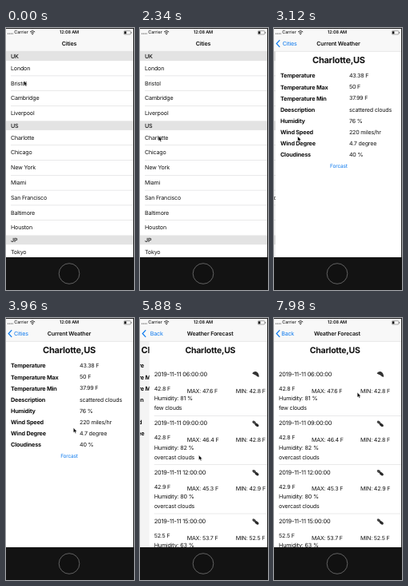
An HTML page that plays this animation: 160x328 px, repeating every 8 s.

```html
<!DOCTYPE html>
<html lang="en">
<head>
<meta charset="utf-8">
<title>Weather app</title>
<style>
  html, body { margin: 0; width: 100%; height: 100%; overflow: hidden; background: #111; }
  svg { display: block; width: 100%; height: 100%; }
  text {
    font-family: Inter, Roboto, "Liberation Sans", sans-serif;
    letter-spacing: -.025em; white-space: pre; text-rendering: geometricPrecision;
  }
</style>
</head>
<body>
<svg id="stage" viewBox="0 0 160 328"></svg>
<script>
const BLUE = '#0a78ee', LOOP = 8000, STEP = 60;

// y is the middle of the capitals
function text(s, x, y, { size = 7.1, weight = 400, anchor = 'start', fill = '#111', id = '' } = {}) {
  return `<text ${id && `id="${id}"`} x="${x}" y="${y + size * .36}" font-size="${size}"
    font-weight="${weight}" text-anchor="${anchor}" fill="${fill}">${s}</text>`;
}
const rect = (x, y, w, h, fill, more = '') =>
  `<rect x="${x}" y="${y}" width="${w}" height="${h}" fill="${fill}" ${more}/>`;
const rule = y => rect(6, y - .25, 154, .5, '#d2d2d4');
const page = (id, body) =>
  `<g id="${id}">${rect(0, 29, 160, 259, '#fff')}${body}${rect(0, 29, 160, 259, '#000', 'class="dim" opacity="0"')}</g>`;

function cityList() {
  const sections = {
    UK: ['London', 'Bristol', 'Cambridge', 'Liverpool'],
    US: ['Charlotte', 'Chicago', 'New York', 'Miami', 'San Francisco', 'Baltimore', 'Houston'],
    JP: ['Tokyo']
  };
  const head = 11.6, row = 18.8;
  let y = 29.5, out = '';
  for (const [country, cities] of Object.entries(sections)) {
    out += rect(0, y, 160, head, '#e3e3e3') + text(country, 6, y + 5.8, { weight: 500 });
    y += head;
    cities.forEach((city, i) => {
      if (i) out += rule(y);
      out += text(city, 6, y + 9.2);
      y += row;
    });
  }
  return out;
}

function currentWeather() {
  const facts = [
    ['Temperature', '43.38 F'], ['Temperature Max', '50 F'], ['Temperature Min', '37.99 F'],
    ['Deescription', 'scattered clouds'], ['Humidity', '76 %'], ['Wind Speed', '220 miles/hr'],
    ['Wind Degree', '4.7 degree'], ['Cloudiness', '40 %']
  ];
  return text('Charlotte,US', 79, 40.4, { size: 11, weight: 700, anchor: 'middle' }) +
    facts.map(([name, value], i) => {
      const y = 59.8 + 14.15 * i;
      return text(name, 6, y, { size: 7.25, weight: 700 }) + text(value, 92, y - .3);
    }).join('') +
    text('Forcast', 79, 172.3, { size: 6.5, anchor: 'middle', fill: BLUE });
}

function cloud(y, double) {
  const puff = (x, dy, rx, fill) =>
    `<ellipse rx="${rx}" ry="1.7" fill="${fill}" transform="translate(${x} ${dy}) rotate(35)"/>`;
  const shape = double
    ? puff(131, -1.4, 2.5, '#444') + puff(134.3, 1.7, 2.9, '#2a2a2a')
    : '<path d="M128.6 -1.2Q129.6 -4.2 133 -3.8Q137 -2.6 137.2 3Q134.8 3.2 133.2 1Q131.2 .2 128.6 -1.2z" fill="#333"/>';
  return `<g transform="translate(0 ${y})">${shape}</g>`;
}

function forecast() {
  const hours = [
    ['06', 42.8, 47.6, 81, 'few clouds'], ['09', 42.8, 46.4, 82, 'overcast clouds'],
    ['12', 42.9, 45.3, 80, 'overcast clouds'], ['15', 52.5, 53.7, 63, 'few clouds']
  ];
  return text('Charlotte,US', 76.2, 40.5, { size: 10.5, weight: 700, anchor: 'middle' }) +
    hours.map(([hour, min, max, humidity, sky], i) => {
      const y = 70.4 + 61.3 * i;
      return text(`2019-11-11 ${hour}:00:00`, 6, y, { size: 7.4 }) + cloud(y + .4, i > 0) +
        text(`${min} F`, 6, y + 18) +
        text(`MAX: ${max} F`, 47, y + 20.7) +
        text(`MIN: ${min} F`, 108, y + 20.7) +
        text(`Humidity: ${humidity} %`, 6, y + 30.5, { size: 7.2 }) +
        text(sky, 6, y + 42.5) + rule(y + 52);
    }).join('');
}

function statusBar() {
  const dots = [2.5, 4.4, 6.3, 8.2].map(x => `<circle cx="${x}" cy="7" r=".6" fill="#222"/>`).join('');
  return dots + text('Carrier', 10.3, 5.4, { size: 5.6 }) +
    `<g fill="none" stroke="#222" stroke-width=".9"><path d="M30 4.9q3.1-2.8 6.2 0M31.3 6.3q1.8-1.6 3.6 0"/></g>
     <circle cx="33.1" cy="7.6" r=".8" fill="#222"/>` +
    text('12:08 AM', 79, 5.4, { size: 5.5, weight: 600, anchor: 'middle' }) +
    rect(147.3, 3.6, 8.6, 4.4, 'none', 'rx="1" stroke="#555" stroke-width=".5"') +
    rect(148, 4.3, 2.4, 3, '#111') + rect(156.4, 5, .8, 1.6, '#555');
}

function navBar() {
  const title = { weight: 600, anchor: 'middle' };
  return rect(0, 0, 160, 29, '#f8f8f8') + rect(0, 28.9, 160, .5, '#ccc') + statusBar() +
    `<path id="chevron" d="M7.2 15.2L3.2 19.5L7.2 23.8" fill="none" stroke="${BLUE}" stroke-width="1.2"/>` +
    text('Cities', 79, 19.6, { ...title, id: 'homeTitle' }) +
    text('Current Weather', 79, 19.6, { ...title, id: 'weatherTitle' }) +
    text('Weather Forecast', 79, 19.6, { ...title, id: 'forecastTitle' }) +
    text('Cities', 10, 19.6, { fill: BLUE, id: 'toHome' }) +
    text('Back', 9.2, 19.6, { fill: BLUE, id: 'toWeather' });
}

const stage = document.getElementById('stage');
stage.innerHTML =
  page('home', cityList()) + page('weather', currentWeather()) + page('forecast', forecast()) + navBar() +
  rect(0, 0, 160, 1, '#222') + rect(159, 0, 1, 328, '#222') + rect(0, 287, 160, 41, '#131313') +
  '<circle cx="79" cy="307.5" r="12.8" fill="#111" stroke="#777" stroke-width=".8"/>' +
  '<path id="cursor" d="M0 0V6L1.4 4.8L2.4 7L3.4 6.5L2.5 4.4H4.3z" fill="#000" stroke="#fff" stroke-width=".4"/>';

const el = id => document.getElementById(id);
const clamp = v => Math.min(1, Math.max(0, v));

// critically damped spring, 0 to 1
function spring(ms) {
  const k = Math.max(0, ms) * .0119;
  return 1 - (1 + k) * Math.exp(-k);
}

// time, x, y
const path = [
  [60, 22.3, 66], [1560, 23.3, 135.5], [2940, 23.3, 135.5], [3840, 84.3, 137.5], [4200, 84.3, 137.5],
  [5040, 73.5, 171.8], [6720, 73.5, 171.8], [7500, 104.2, 93.3]
];
function pointer(t) {
  const i = path.findIndex(p => p[0] > t);
  if (i < 0) return path[path.length - 1].slice(1);
  if (!i) return path[0].slice(1);
  const a = path[i - 1], b = path[i], u = (t - a[0]) / (b[0] - a[0]), e = u * u * (3 - 2 * u);
  return [a[1] + (b[1] - a[1]) * e, a[2] + (b[2] - a[2]) * e];
}

function place(id, x, opacity = 1) {
  el(id).setAttribute('transform', `translate(${x} 0)`);
  el(id).setAttribute('opacity', clamp(opacity));
}
const dim = (id, p) => el(id).querySelector('.dim').setAttribute('opacity', .045 * p);

function draw(now) {
  const t = Math.floor(now % LOOP / STEP) * STEP;
  const p = spring(t - 2580), q = spring(t - 5520);

  place('home', -48 * p);
  place('weather', 160 * (1 - p) - 48 * q);
  place('forecast', 160 * (1 - q));
  dim('home', p);
  dim('weather', q);

  place('chevron', 0, p);
  place('homeTitle', -59 * p, 1 - 2 * p);
  place('weatherTitle', 118 * (1 - p) - 53 * q, Math.min(p * 1.3, 1 - 2 * q));
  place('forecastTitle', 118 * (1 - q), q * 1.3);
  place('toHome', 66 * (1 - p) - 40 * q, Math.min(p * 1.3, 1 - 2 * q));
  place('toWeather', 50 * (1 - q), q * 1.3);

  el('cursor').setAttribute('transform', `translate(${pointer(t)})`);
}

const start = performance.now();
function tick() {
  draw(performance.now() - start);
  requestAnimationFrame(tick);
}
tick();
</script>
</body>
</html>
```
